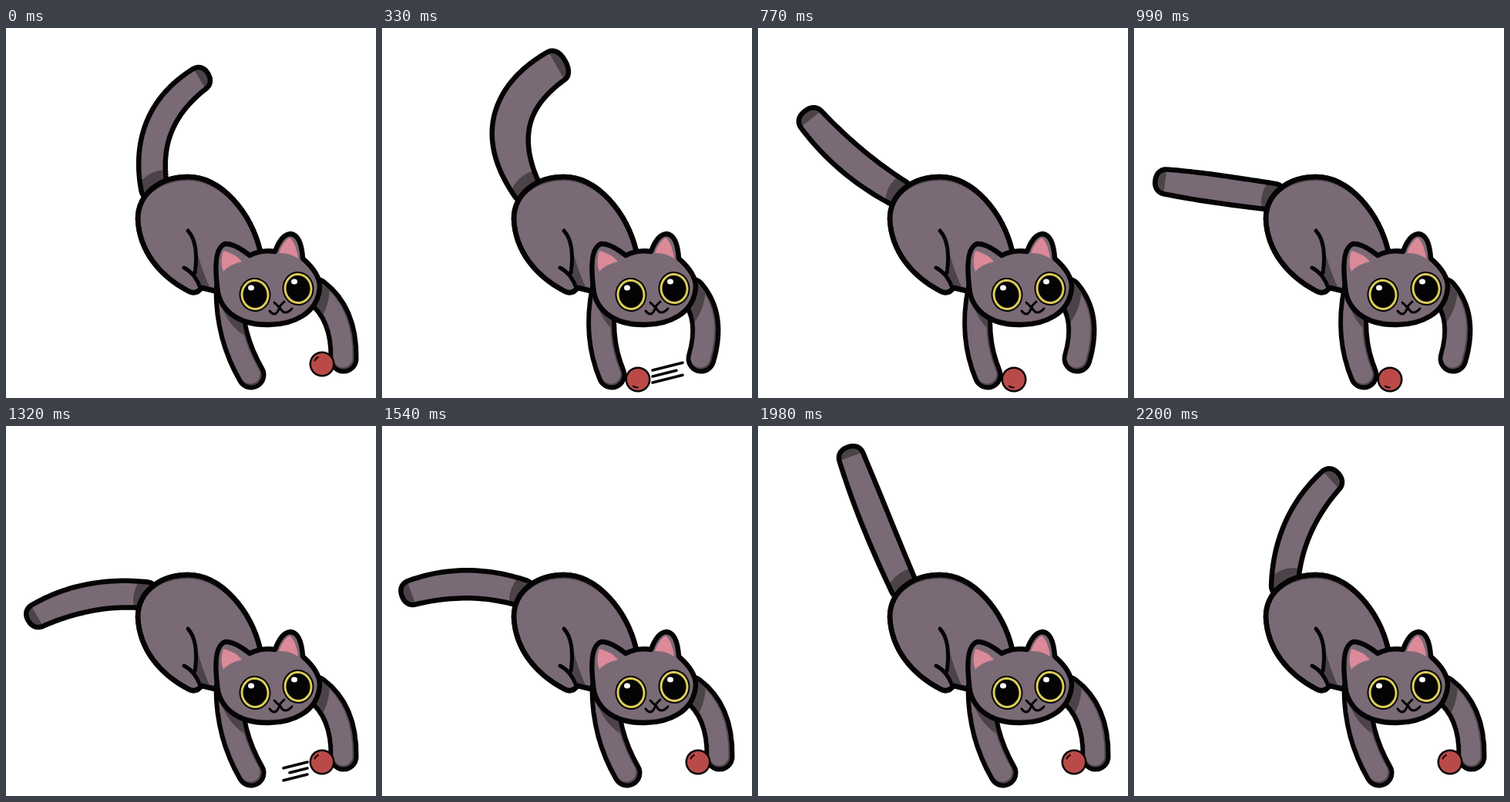
Animation of 480x480 px, one loop 2310 ms. Source, as an HTML page with a canvas:

```html
<!DOCTYPE html>
<html lang="en">
<head>
<meta charset="utf-8">
<title>Cat and ball</title>
<style>
html, body { margin: 0; width: 100%; height: 100%; overflow: hidden; background: #fff; }
canvas { display: block; width: 100vw; height: 100vh; }
</style>
</head>
<body>
<canvas id="stage" width="480" height="480"></canvas>
<script>
const ctx = document.getElementById('stage').getContext('2d');
const STEP = 110, COUNT = 21;
const FUR = '#796a75', DARK = '#4c4349', INK = '#050405', PINK = '#dc8999', RED = '#b94a48', GOLD = '#dccb58';
const ROOT = [195, 221];

// Tail poses: step, lean from upright in degrees, bend, thickness
const poses = [
  [0, 23, -33, 41],
  [3, 14, -50, 54],
  [5, -14, -22, 48],
  [9, -82, 0, 42],
  [12, -101, 15, 41],
  [16, -66, 11, 43],
  [20, 24, -20, 42]
];

const body = new Path2D('M171 248C171 215 200 193 236 193C280 193 318 240 330 290' +
  'L275 342L254 337Q246 347 236 341C200 322 173 290 171 248Z');
const thigh = new Path2D('M247 287Q255 318 268 345L252 338L245 318Z');
const leg = new Path2D('M236 263C247 275 248 297 245 318M231 311Q245 318 252 337');
const head = new Path2D('M316 295Q332 287 349 290Q357 268 369 267Q383 268 385 299Q407 318 407 336' +
  'C405 370 372 386 338 385C300 385 276 365 274 336Q268 286 284 280Q296 279 316 295Z');
const ears = new Path2D('M282 289Q298 293 306 303Q289 307 282 316Q277 303 282 289Z' +
  'M368 272Q376 278 379 299Q367 291 354 292Q360 276 368 272Z');
const mouth = new Path2D('M348 356L354 362L361 355M342 367Q350 377 355 362Q361 375 371 364');

const mix = (a, b, k) => a + (b - a) * k;
const clamp = v => Math.max(0, Math.min(1, v));

function fill(path, color) {
  ctx.fillStyle = color;
  ctx.fill(path);
}

function stroke(path, width, color = INK) {
  ctx.strokeStyle = color;
  ctx.lineWidth = width;
  ctx.stroke(path);
}

function disc(x, y, rx, ry, color, tilt = 0) {
  ctx.beginPath();
  ctx.ellipse(x, y, rx, ry, tilt, 0, 7);
  ctx.fillStyle = color;
  ctx.fill();
}

function clipped(path, paint) {
  ctx.save();
  ctx.clip(path);
  paint();
  ctx.restore();
}

// Furry shape with a dark rim on the side away from the vertical shift
function furry(path, dy) {
  fill(path, DARK);
  clipped(path, () => {
    ctx.translate(0, dy);
    fill(path, FUR);
  });
  stroke(path, 6.5);
}

// Smooth cyclic curve through one column of the tail poses
function poseValue(step, col) {
  const n = poses.length;
  const key = i => {
    const lap = Math.floor(i / n), p = poses[i - lap * n];
    return [p[0] + lap * COUNT, p[col]];
  };
  let i = 0;
  while (key(i + 1)[0] <= step) i++;
  const slope = j => (key(j + 1)[1] - key(j - 1)[1]) / (key(j + 1)[0] - key(j - 1)[0]);
  const [t0, v0] = key(i), [t1, v1] = key(i + 1), span = t1 - t0;
  const k = (step - t0) / span, e = k * k * (3 - 2 * k);
  return mix(v0, v1, e) + span * k * (1 - k) * (slope(i) * (1 - k) - slope(i + 1) * k);
}

function drawTail(step) {
  const lean = poseValue(step, 1), bend = poseValue(step, 2) * 4 / 3, thick = poseValue(step, 3);
  const length = 172 + 44 * Math.exp(-(((lean + 14) / 26) ** 2));
  const a = lean * Math.PI / 180, sin = Math.sin(a), cos = Math.cos(a);
  const along = (d, side) => [ROOT[0] + d * sin + side * cos, ROOT[1] - d * cos + side * sin];
  const p = [ROOT, along(length / 3, bend), along(length * 2 / 3, bend), along(length, 0)];
  const reach = Math.hypot(p[3][0] - p[2][0], p[3][1] - p[2][1]) * 3;
  const round = gap => gap < 14 ? Math.max(0, 1 - (1 - gap / 14) ** 2.3) ** (1 / 2.3) : 1;
  const end = 1 - 3 / reach, left = [], right = [];
  let tip, normal;
  for (let n = 0; n <= 50; n++) {
    const t = end * (1 - Math.cos(Math.PI * n / 50)) / 2, s = 1 - t;
    const [x, y] = [0, 1].map(j =>
      s ** 3 * p[0][j] + 3 * s * s * t * p[1][j] + 3 * s * t * t * p[2][j] + t ** 3 * p[3][j]);
    const [dx, dy] = [0, 1].map(j =>
      s * s * (p[1][j] - p[0][j]) + 2 * s * t * (p[2][j] - p[1][j]) + t * t * (p[3][j] - p[2][j]));
    const len = Math.hypot(dx, dy);
    const wide = t < 0.5 ? mix(40, thick, Math.sin(Math.PI * t)) : mix(thick, thick * 0.86, (2 * t - 1) ** 2);
    const h = (wide / 2 - 3) * round((end - t) * reach) * round(t * reach);
    normal = [-dy / len, dx / len];
    tip = [x, y];
    left.push([x + normal[0] * h, y + normal[1] * h]);
    right.unshift([x - normal[0] * h, y - normal[1] * h]);
  }
  const path = new Path2D();
  left.concat(right).forEach(q => path.lineTo(...q));
  path.closePath();
  fill(path, FUR);
  clipped(path, () => {
    disc(207, 226, 42, 42, DARK);
    const edge = new Path2D();
    [-30, 30].forEach(d => edge.lineTo(tip[0] + normal[0] * d, tip[1] + normal[1] * d));
    stroke(edge, 26, DARK);
  });
  stroke(path, 6.5);
}

function drawBody() {
  furry(body, 5);
  clipped(body, () => fill(thigh, DARK));
  stroke(body, 6.5);
  stroke(leg, 5);
}

// Round-ended limb, dark where the head shades it
function drawArm(x, y, elbowX, elbowY, pawX, pawY) {
  const path = new Path2D();
  path.moveTo(x, y);
  path.quadraticCurveTo(elbowX, elbowY, pawX, pawY);
  const shade = ctx.createRadialGradient(349, 340, 71, 349, 340, 72);
  shade.addColorStop(0, DARK);
  shade.addColorStop(1, FUR);
  stroke(path, 39);
  stroke(path, 27, DARK);
  ctx.save();
  ctx.translate(-1, -1);
  stroke(path, 25, shade);
  ctx.restore();
}

function drawEye(x, y) {
  disc(x, y, 20.5, 22, INK, -0.1);
  disc(x, y, 18.5, 20, GOLD, -0.1);
  disc(x, y, 15.5, 17, INK, -0.1);
  disc(x - 5, y - 9, 4, 3.5, '#fff');
}

function drawHead() {
  furry(head, -4);
  fill(ears, PINK);
  drawEye(323, 346);
  drawEye(379, 338);
  stroke(mouth, 3);
}

function drawBall(x, y, place) {
  disc(x, y, 16.5, 16.5, INK);
  disc(x, y, 14, 14, RED);
  const glint = new Path2D(), turn = mix(3.6, 1.6, place);
  glint.arc(x, y, 10.5, turn, turn + 0.6);
  stroke(glint, 2);
}

// Three strokes trailing on the given side of the ball
function drawSpeed(x, y, side) {
  for (let i = -1; i <= 1; i++) {
    const len = 27 + 8 * Math.abs(i) + 4 * side, top = y + 2 - 6 * side + 8 * i;
    const path = new Path2D();
    path.moveTo(x + side * 19, top);
    path.lineTo(x + side * (19 + len), top - side * len * 0.25);
    stroke(path, 3.5);
  }
}

function draw(step) {
  ctx.fillStyle = '#fff';
  ctx.fillRect(0, 0, 480, 480);
  ctx.lineCap = ctx.lineJoin = 'round';
  // 0 is right, 1 is left; the ball follows one step behind the paws
  const paw = clamp(Math.min(step, 11 - step) / 2);
  const ball = clamp(Math.min(step - 1, 12 - step) / 2);
  const x = mix(410, 332, ball), y = mix(436, 456, ball);
  drawTail(step);
  drawBody();
  drawArm(289, 340, mix(289, 277, paw), 400, mix(318, 298, paw), 450);
  drawArm(402, 342, mix(439, 430, paw), mix(370, 375, paw), mix(438, 414, paw), 429);
  drawHead();
  if (step === 2 || step === 3) drawSpeed(x, y, 1);
  if (step === 11 || step === 12) drawSpeed(x, y, -1);
  drawBall(x, y, ball);
}

const start = performance.now();
function tick() {
  draw(Math.floor((performance.now() - start) / STEP) % COUNT);
  requestAnimationFrame(tick);
}
tick();
</script>
</body>
</html>
```
